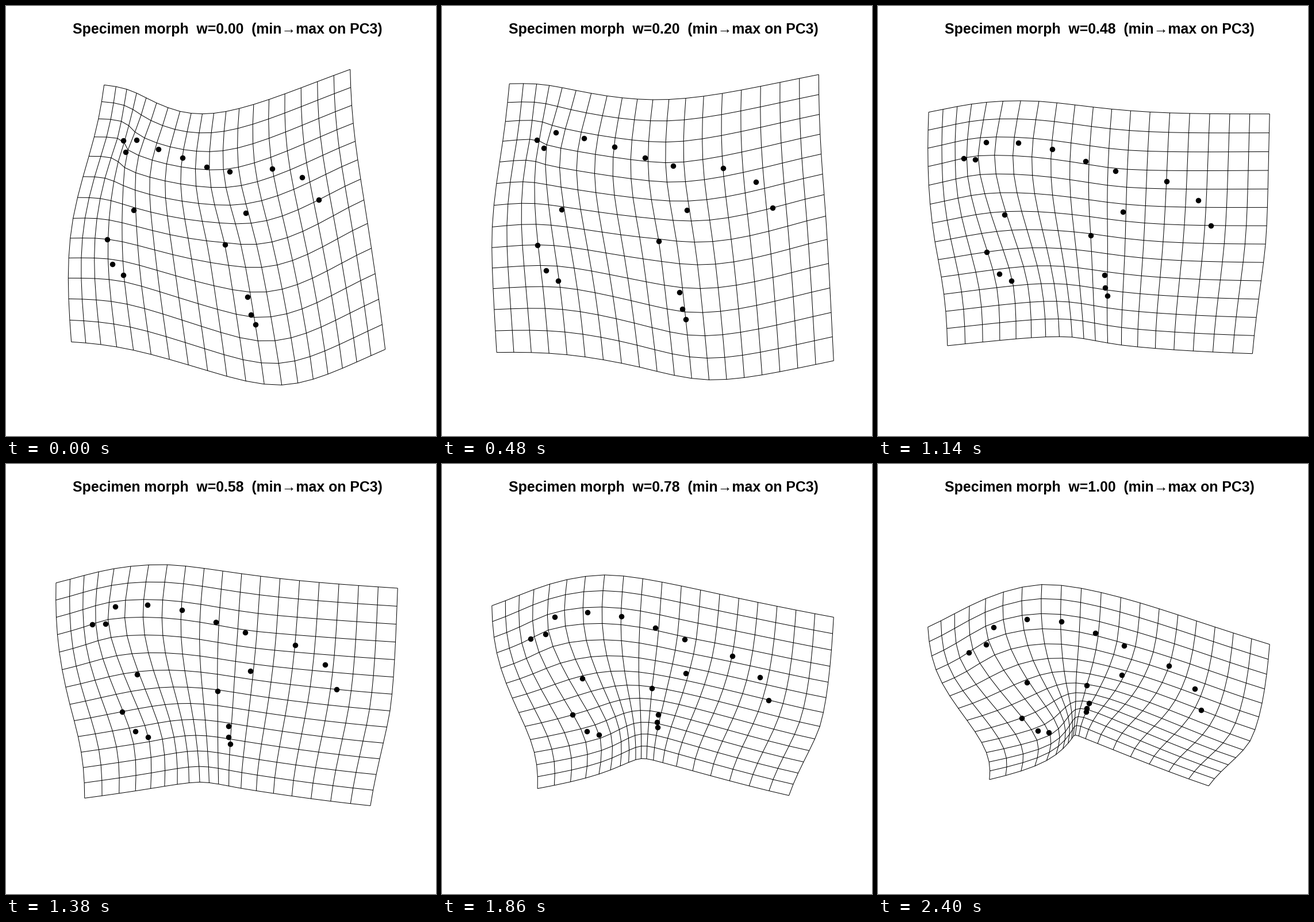
Animation of 748x748 px, one loop 2.46 s. Source, as a matplotlib script:

```python
import matplotlib.pyplot as plt
import numpy as np
from matplotlib.animation import FuncAnimation
from matplotlib.collections import LineCollection

SIZE, DPI = 748, 100
FRAMES, INTERVAL = 41, 60
COLS, ROWS = 20, 14
CENTER = np.array([384.0, 384.8])
FIT = np.array([594.5, 549.0])  # largest grid width and height

# Key points: (grid column, row), place in the first and in the last shape
RIM = [
    ((0, 0), (172, 137), (88, 284)),
    ((7, 0), (304, 183), (286, 210)),
    ((12, 0), (407, 178), (457, 242)),
    ((19, 0), (600, 110), (682, 314)),
    ((0, 7), (118, 369), (156, 446)),
    ((19, 7), (624, 337), (648, 482)),
    ((0, 13), (115, 584), (195, 549)),
    ((8, 13), (352, 634), (338, 478)),
    ((12, 13), (481, 659), (362, 478)),
    ((19, 13), (661, 597), (576, 560)),
]
PINS = [
    ((2.7, 3.0), (205, 234), (159, 328)),
    ((3.8, 3.2), (209, 254), (189, 314)),
    ((11.4, 3.15), (390, 288), (429, 316)),
    ((10, 7.1), (382, 415), (364, 385)),
    ((11, 10.3), (435, 554), (363, 431)),
    ((3.95, 9.7), (205, 468), (298, 467)),
]
GRID_KEYS, FIRST_KEYS, LAST_KEYS = np.array(RIM + PINS, float).transpose(1, 0, 2)

# Landmarks: the pins, a shallow arc of four, and the rest
ARC = [(4.43 + 1.8 * k, 2.27 + 0.09 * (k - 0.5) ** 2) for k in range(4)]
REST = [(14, 3.6), (15.6, 4.6), (16.3, 6), (11.85, 5.45), (10.8, 9.2),
        (10.85, 9.9), (4.85, 6.15), (2.95, 8), (3.3, 9.25)]
MARKS = np.array([pin[0] for pin in PINS] + ARC + REST)
NODES = np.array([(c, r) for r in range(ROWS) for c in range(COLS)], float)


def kernel(p, q):
    d2 = ((p[:, None] - q[None]) ** 2).sum(axis=2)
    return d2 * np.log(np.where(d2 > 0, d2, 1))


def affine(p):
    return np.column_stack([np.ones(len(p)), p])


def warp(points, src, dst):
    """Thin-plate spline taking src to dst, evaluated at points."""
    a = affine(src)
    system = np.block([[kernel(src, src), a], [a.T, np.zeros((3, 3))]])
    weights = np.linalg.solve(system, np.vstack([dst, np.zeros((3, 2))]))
    return np.hstack([kernel(points, src), affine(points)]) @ weights


def unit_shape(keys):
    """Grid nodes and landmarks, scaled to unit centroid size."""
    nodes, marks = (warp(p, GRID_KEYS, keys) for p in (NODES, MARKS))
    mid = marks.mean(axis=0)
    size = np.linalg.norm(marks - mid)
    return (nodes - mid) / size, (marks - mid) / size


FIRST, LAST = unit_shape(FIRST_KEYS), unit_shape(LAST_KEYS)


def pose(w):
    nodes, marks = ((1 - w) * a + w * b for a, b in zip(FIRST, LAST))
    low, high = nodes.min(axis=0), nodes.max(axis=0)
    scale = (FIT / (high - low)).min()

    def place(p):
        return CENTER + scale * (p - (low + high) / 2)

    return place(nodes).reshape(ROWS, COLS, 2), place(marks)


def px(n):
    return n * 72 / DPI


fig = plt.figure(figsize=(SIZE / DPI, SIZE / DPI), dpi=DPI, facecolor="white")
ax = fig.add_axes([0, 0, 1, 1])
ax.set_xlim(0, SIZE)
ax.set_ylim(SIZE, 0)
ax.axis("off")

grid = LineCollection([], colors="black", linewidths=px(1))
ax.add_collection(grid, autolim=False)
dots, = ax.plot([], [], "o", color="black", markersize=px(9.5),
                markeredgewidth=0)
title = ax.text(385.5, 48, "", ha="center", va="baseline", color="black",
                family="Liberation Sans", weight="bold", size=px(24.85))


def update(frame):
    w = frame * 0.025
    nodes, marks = pose(w)
    grid.set_segments(list(nodes) + list(nodes.transpose(1, 0, 2)))
    dots.set_data(marks[:, 0], marks[:, 1])
    title.set_text(f"Specimen morph  w={w:.2f}  (min\u2192max on PC3)")
    return grid, dots, title


anim = FuncAnimation(fig, update, frames=FRAMES, interval=INTERVAL,
                     repeat=True, repeat_delay=0)
plt.show()
```
